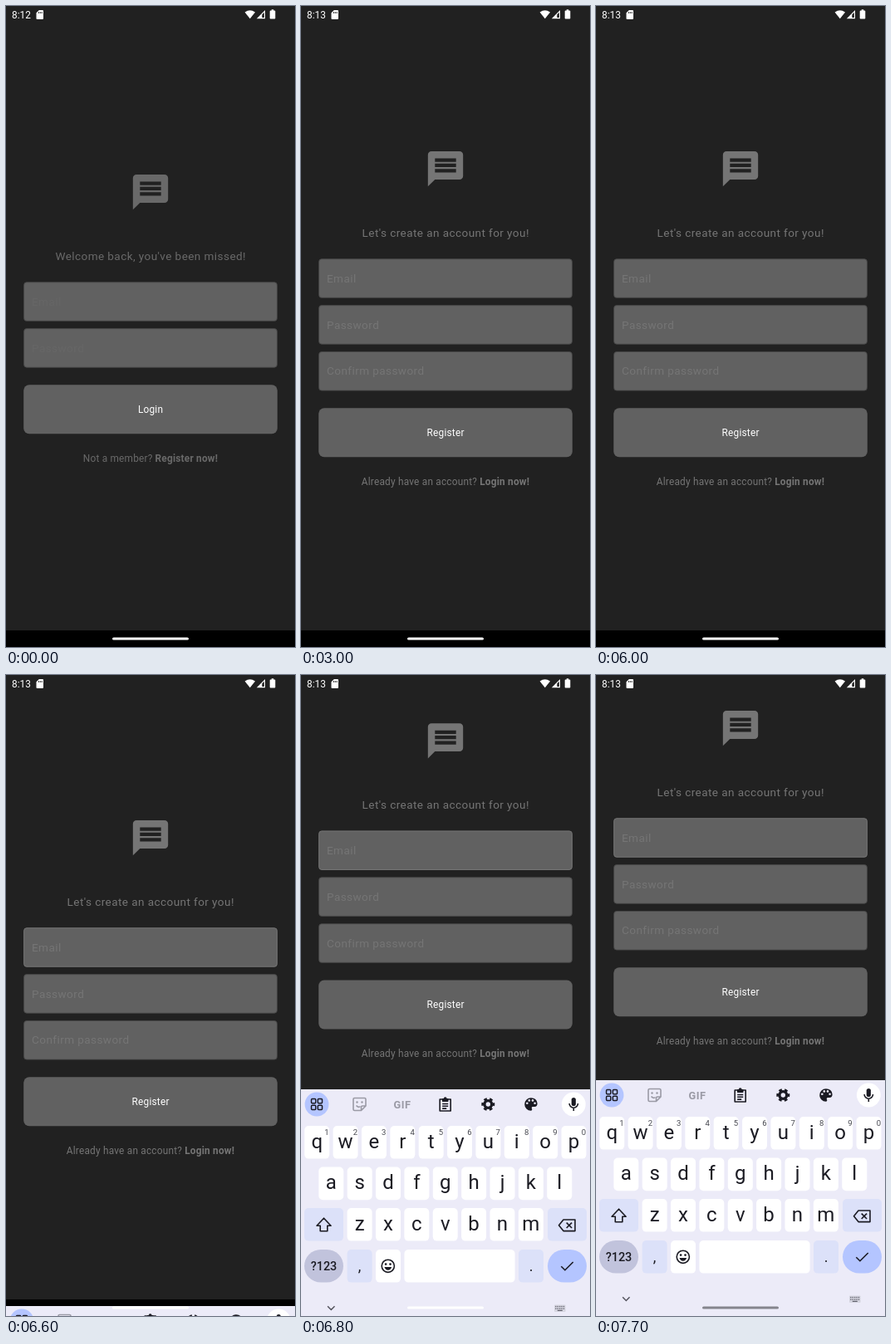
An HTML page that plays this animation: 348 px wide and 772 px high, repeating every 8000 ms.

```html
<!DOCTYPE html>
<html lang="en">
<head>
<meta charset="utf-8">
<title>Sign up screen</title>
<style>
  html, body { margin: 0; width: 100%; height: 100%; overflow: hidden; background: #212121; }
  svg { display: block; width: 348px; height: 772px; font-family: Roboto, Arial, sans-serif; }
  .title { font-size: 13.55px; letter-spacing: .42px; fill: #757575; text-anchor: middle; }
  .hint { font-size: 13.55px; letter-spacing: .42px; fill: #757575; }
  .body { font-size: 11.85px; letter-spacing: .21px; fill: #757575; }
  .button { font-size: 11.85px; letter-spacing: .21px; fill: #fff; text-anchor: middle; }
  .bold { font-weight: 700; }
  .key { font-size: 24px; fill: #1b1b23; text-anchor: middle; }
  .digit { font-size: 9.5px; fill: #45464f; text-anchor: middle; }
  .line { fill: none; stroke: #1b1b23; stroke-width: 1.6; stroke-linejoin: round; }
  .soft { fill: none; stroke: #9a9aa5; stroke-width: 1.6; stroke-linejoin: round; }
</style>
</head>
<body>
<svg viewBox="0 0 348 772">
  <rect width="348" height="772" fill="#212121"/>
  <g id="form"><g id="login"></g><g id="register"></g></g>
  <g fill="#fff">
    <text id="clock" x="7" y="15" font-size="11.85"></text>
    <path d="M39.8 5H44q1 0 1 1v9q0 1-1 1h-6.5q-1 0-1-1V8.300z"/>
    <path d="M39.400 7v2M41.300 7v2M43.200 7v2" stroke="#212121" stroke-width=".9"/>
    <path d="M293.800 15.300 287.600 7.600Q293.800 2.800 300 7.600z"/>
    <path d="M301.800 15.200 312 5v10.200z"/>
    <path d="M308.300 10.300 310.900 7.700v6.400h-2.600z" fill="#212121"/>
    <path d="M319.700 5.400V4.200h2.600v1.200h1.200q.8 0 .8.800v8.600q0 .8-.8.800h-5q-.8 0-.8-.8V6.200q0-.8.8-.8z"/>
  </g>
  <rect y="752" width="348" height="20"/>
  <g id="keyboard"></g>
  <rect id="handle" x="128" y="760.400" width="92" height="3.200" rx="1.600"/>
</svg>
<script>
const $ = id => document.getElementById(id);
const text = (cls, x, y, s) => `<text class="${cls}" x="${x}" y="${y}">${s}</text>`;
const box = (x, y, w, h, r, fill, extra = '') =>
  `<rect x="${x}" y="${y}" width="${w}" height="${h}" rx="${r}" fill="${fill}" ${extra}/>`;
const dot = (x, y, r, fill) => `<circle cx="${x}" cy="${y}" r="${r}" fill="${fill}"/>`;
const at = (x, y, s) => `<g transform="translate(${x} ${y})">${s}</g>`;
const line = (d, cls = 'line') => `<path class="${cls}" d="${d}"/>`;

// Sign-in forms; "top" is the first field's upper edge
const BUBBLE = 'M20 2H4c-1.1 0-2 .9-2 2v18l4-4h14c1.1 0 2-.9 2-2V4c0-1.1-.9-2-2-2z' +
  'm-2 12H6v-2h12zm0-3H6V9h12zm0-3H6V6h12z';

function screen({ top, title, hints, button, ask, askX, link, linkX }) {
  const field = (hint, i) => {
    const y = top + i * 55.9;
    return box(21.6, y + .4, 304.8, 46.6, 3.4, '#616161', 'class="field" stroke="#484848" stroke-width=".85"') +
      text('hint', 31, y + 28.3, hint);
  };
  const by = top + hints.length * 55.9 + 12.2;
  return `<path class="mark" transform="translate(148.600 ${top - 133.5}) scale(2.117)" d="${BUBBLE}" fill="#757575"/>` +
    text('title', 174.2, top - 26.5, title) +
    hints.map(field).join('') +
    box(21.2, by, 305.6, 59, 6.8, '#616161') +
    text('button', 174.1, by + 33.8, button) +
    text('body', askX, by + 93, ask) +
    text('body bold', linkX, by + 93, link);
}

$('login').innerHTML = screen({
  top: 332.3, title: "Welcome back, you've been missed!", hints: ['Email', 'Password'],
  button: 'Login', ask: 'Not a member?', askX: 92.8, link: 'Register now!', linkX: 179.6
});
$('register').innerHTML = screen({
  top: 304.3, title: "Let's create an account for you!", hints: ['Email', 'Password', 'Confirm password'],
  button: 'Register', ask: 'Already have an account?', askX: 72.8, link: 'Login now!', linkX: 215.2
}) + box(31, 318, 1.7, 20, .8, '#7d7d7d', 'id="cursor"');

// Keyboard, measured from its upper edge
const INK = '#1b1b23', TINT = '#dce1f9', BLUE = '#b4c5ff', PITCH = 34.37;
const tile = (x, y, w, fill, r = 5) => box(x, y, w, 39.6, r, fill);

function letters(chars, first, y, digits = '') {
  return [...chars].map((c, i) => {
    const x = first + i * PITCH;
    return tile(x - 15, y, 30, '#fff') + text('key', x, y + 26.5, c) +
      (digits ? text('digit', x + 11.8, y + 11.3, digits[i]) : '');
  }).join('');
}

function toolbar() {
  const grid = [-6.5, 1.3].map(x => [-6.5, 1.3].map(y =>
    box(x, y, 5.2, 5.2, 1, 'none', `stroke="${INK}" stroke-width="1.500"`)).join('')).join('');
  const sticker = line('M-6 -7.500H6q1.500 0 1.500 1.500V2L2 7.500H-6q-1.500 0-1.500-1.500V-6q0-1.500 1.500-1.500zM7.500 2H3.500Q2 2 2 3.500V7.500M-4 1.500Q-1.500 4.500 1 2.500', 'soft') +
    dot(-3, -2.5, 1.2, '#9a9aa5') + dot(3, -2.5, 1.2, '#9a9aa5');
  const clip = line('M-6.500 -6.500H6.500V7.500H-6.500zM-3.500 -1H3.500M-3.500 1.800H3.500M-3.500 4.600H1.500') +
    box(-3.8, -7.5, 7.6, 4, .8, INK) + dot(0, -7.4, 1.9, INK);
  const gear = `<g fill="none" stroke="${INK}"><circle r="4.400" stroke-width="3.400"/>` +
    `<circle r="6.600" stroke-width="2.800" stroke-dasharray="3.700 3.211" stroke-dashoffset="1.850"/></g>`;
  const palette = `<path fill="${INK}" d="M0 -7.700a7.700 7.700 0 0 0 0 15.400q1.400 0 1.400-1.400-.1-.6-.5-1.200Q.5 3.200 2 3h2.200q3.500 0 3.500-4Q7-7.700 0-7.700z"/>` +
    [[-4.6, -1.2], [-2.1, -4.6], [2.1, -4.6], [4.7, -1.2]].map(([x, y]) => dot(x, y, 1.3, '#ecebf8')).join('');
  const mic = box(-2.6, -8, 5.2, 10, 2.6, INK) + line('M-5.200 -1a5.200 5.200 0 0 0 10.400 0M0 4.300V8');
  return at(19, 18, dot(0, 0, 14.4, BLUE) + grid) + at(70.5, 18, sticker) +
    `<text x="122" y="22.500" font-size="12.800" font-weight="700" letter-spacing=".5" text-anchor="middle" fill="#9a9aa5">GIF</text>` +
    at(173.7, 18.5, clip) + at(225.3, 18, gear) + at(276.9, 18, palette) +
    at(328.3, 18, dot(0, 0, 14.4, '#fff') + mic);
}

function lowerKeys() {
  const shift = line('M0 -8.300 8.500 .8H4.300V7.300H-4.300V.8H-8.500z');
  const erase = line('M-4.500 -6.800H9.500V6.800H-4.500L-10 0zM-.8 -3.200 5.600 3.200M5.600 -3.200-.8 3.200');
  const smile = '<circle class="line" r="7.600"/>' + dot(-2.7, -2.2, 1.3, INK) + dot(2.7, -2.2, 1.3, INK) +
    `<path fill="${INK}" d="M-4.400 1.300H4.400Q3.200 4.900 0 4.900T-4.400 1.300z"/>`;
  const dots = [0, 1, 2, 3, 4].map(i => [-2.6, 0].map(y => box(-5.6 + i * 2.4, y, 1.3, 1.3, 0, '#60606c')).join('')).join('');
  const mini = box(-6.8, -4, 13.6, 8.4, 1, '#d5d5e0') + dots + box(-3, 2.3, 6, 1.2, 0, '#60606c');
  return tile(4, 143, 47, TINT) + at(27.5, 163.5, shift) +
    tile(297, 143, 47, TINT) + at(320.5, 163.8, erase) +
    tile(4, 193, 47, '#c1c3dc', 19.8) +
    `<text x="27.500" y="218.200" font-size="14.400" font-weight="500" text-anchor="middle" fill="${INK}">?123</text>` +
    tile(55.6, 193, 30, TINT) + `<text class="key" x="70.600" y="219" style="font-size:18px">,</text>` +
    tile(90, 193, 30, '#fff') + at(104.8, 212.8, smile) +
    tile(124.4, 193, 133.2, '#fff') +
    tile(262, 193, 30, TINT) + `<text class="key" x="277" y="219" style="font-size:18px">.</text>` +
    tile(297, 193, 47, BLUE, 19.8) + at(320.5, 213, line('M-7.200 .2-2.600 4.800 7.200-5')) +
    at(36.3, 263.5, `<path d="M-4.200 -2.200 0 2 4.200-2.200" fill="none" stroke="#55555f" stroke-width="1.500"/>`) +
    at(311.8, 263.5, mini);
}

$('keyboard').innerHTML = box(0, 0, 348, 290, 0, '#ecebf8') + toolbar() +
  letters('qwertyuiop', 19.2, 44, '1234567890') +
  letters('asdfghjkl', 36.3, 93.6) +
  letters('zxcvbnm', 70.6, 143) + lowerKeys();

// Each step changes only the values it names
const STEPS = [
  [0, { clock: '8:12', page: 'login', hint: .25, ink: .86, focus: false, keys: 772, lift: 0, cursor: 0, handle: '#fff' }],
  [100, { hint: .75, ink: .95 }],
  [200, { hint: 1, ink: 1 }],
  [600, { clock: '8:13' }],
  [3000, { page: 'register' }],
  [6300, { focus: true }],
  [6600, { keys: 760 }],
  [6700, { keys: 579, lift: 86.5 }],
  [6800, { keys: 499, lift: 116.8 }],
  [6900, { keys: 488, lift: 130 }],
  [7000, { lift: 132 }],
  [7200, { cursor: .5, handle: '#c4c4cc' }],
  [7300, { cursor: 1, handle: '#8d8d95' }],
  [7500, { handle: '#85858d' }],
  [7700, { cursor: 0 }]
];
const LOOP = 8000;
const hints = document.querySelectorAll('#login .hint');
const inked = document.querySelectorAll('#login .mark, #login .title, #login .body');
const email = document.querySelector('#register .field');

function draw(time) {
  const s = Object.assign({}, ...STEPS.filter(([t]) => t <= time).map(([, v]) => v));
  $('clock').textContent = s.clock;
  for (const id of ['login', 'register']) $(id).style.display = s.page === id ? '' : 'none';
  hints.forEach(el => el.style.opacity = s.hint);
  inked.forEach(el => el.style.opacity = s.ink);
  email.setAttribute('stroke', s.focus ? '#7d7d7d' : '#484848');
  $('cursor').style.opacity = s.cursor;
  $('form').setAttribute('transform', `translate(0 ${-s.lift})`);
  $('keyboard').setAttribute('transform', `translate(0 ${s.keys})`);
  $('handle').setAttribute('fill', s.handle);
}

const start = performance.now();
function tick() {
  draw((performance.now() - start) % LOOP);
  requestAnimationFrame(tick);
}
tick();
</script>
</body>
</html>
```
